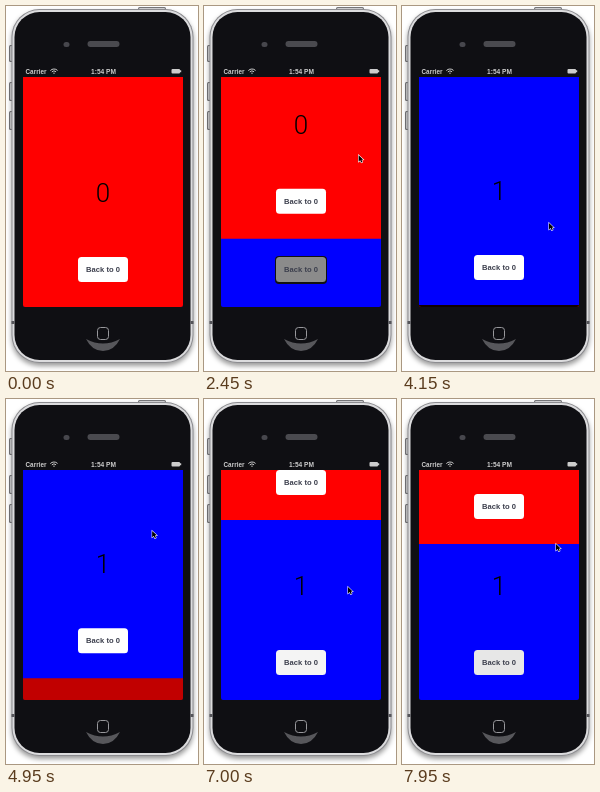
These frames come from a looping animation (192 px wide and 365 px high, 8000 ms). An HTML page with a canvas:

```html
<!DOCTYPE html>
<html lang="en">
<head>
<meta charset="utf-8">
<title>Swipe pages</title>
<style>
html, body { margin: 0; width: 100%; height: 100%; overflow: hidden; background: #fff; }
canvas { display: block; width: 192px; height: 365px; }
</style>
</head>
<body>
<canvas id="stage"></canvas>
<script>
const LOOP = 8000, STEP = 50, H = 230;
const BODY = '#0f0f13', STATUS = '#ccc';
const SANS = '"Liberation Sans", Arial, sans-serif';
const canvas = document.getElementById('stage');
const c = canvas.getContext('2d');
const ratio = window.devicePixelRatio || 1;
canvas.width = 192 * ratio;
canvas.height = 365 * ratio;
c.scale(ratio, ratio);

function ease(t, from, to) {
  const p = Math.min(1, Math.max(0, (t - from) / (to - from)));
  return p * p * (3 - 2 * p);
}

// Page offsets and pointer place, each a sum of gestures
function pose(t) {
  const enter = ease(t, 900, 1550);
  const swipe = ease(t, 1800, 2700), settle = ease(t, 2700, 3050);
  const back = ease(t, 3050, 3650);
  const nudge = ease(t, 4090, 4750), bounce = ease(t, 4750, 5050);
  const rest = ease(t, 4750, 5600);
  const grab = ease(t, 5600, 5900), pull = ease(t, 6200, 7000);
  const finish = ease(t, 7000, 7400), leave = ease(t, 7400, 7950);
  return {
    first: -84 * swipe - 146 * settle + 14 * grab + 36 * pull + 24 * finish,
    second: 84 * (bounce - nudge),
    x: 195 - 42 * enter + 2 * swipe - 8 * back - 6 * rest + 3 * pull + 10 * leave,
    y: 290 - 71 * enter - 86 * (swipe - back + nudge) - 8 * rest
      + 14 * grab + 49 * pull + 24 * finish - 67 * leave
  };
}

function box(x, y, w, h, r, fill) {
  c.beginPath();
  c.roundRect(x, y, w, h, r);
  c.fillStyle = fill;
  c.fill();
}

function label(str, x, y, font, color, align = 'center') {
  c.font = font;
  c.textAlign = align;
  c.fillStyle = color;
  c.fillText(str, x, y);
}

function phone() {
  box(0, 0, 192, 365, 0, '#fff');

  // Side and top buttons
  for (const [y, h] of [[39, 17], [76, 19], [105, 19]]) {
    box(3, y, 4, h, 1.5, '#77777a');
    box(4, y + 1, 3, h - 2, 1, '#d4d4d6');
  }
  box(132, 1, 28, 4, 1.5, '#77777a');
  box(133, 2, 26, 3, 1, '#d4d4d6');

  c.save();
  c.shadowColor = 'rgba(0,0,0,.4)';
  c.shadowBlur = 5 * ratio;
  c.shadowOffsetY = 3 * ratio;
  box(5.5, 3, 182, 354, 28, '#8c8c90');
  c.restore();
  box(6.5, 4, 180, 352, 27, '#dcdcde');
  box(8.5, 6, 176, 348, 25, BODY);
  for (const x of [5.5, 184.5]) box(x, 315, 3, 3, 0, '#55555a');

  // Camera and speaker
  box(57.5, 36, 6, 5, 2.5, '#47474d');
  box(81.5, 35, 32, 6, 3, '#4a4a4f');

  // Home button
  c.beginPath();
  c.moveTo(80, 333);
  c.quadraticCurveTo(97, 342, 114, 333);
  c.quadraticCurveTo(108, 345, 97, 345);
  c.quadraticCurveTo(86, 345, 80, 333);
  c.fillStyle = '#57575b';
  c.fill();
  box(91.5, 321.5, 11, 12, 3, BODY);
  c.strokeStyle = '#98989c';
  c.lineWidth = 1;
  c.stroke();

  // Status bar
  label('Carrier', 19.5, 67.8, `bold 6.4px ${SANS}`, STATUS, 'left');
  label('1:54 PM', 97.5, 67.8, `bold 6.6px ${SANS}`, STATUS);
  c.strokeStyle = STATUS;
  for (const r of [1, 3, 5]) {
    c.beginPath();
    c.arc(48, 68, r, -Math.PI * .76, -Math.PI * .24);
    c.stroke();
  }
  box(165.5, 63, 8.5, 4.5, 1, STATUS);
  box(174, 64.3, 1.2, 2, 0, STATUS);
}

// reveal: how far the page above has been pulled away, 0 to 1
function page(n, y, reveal) {
  const shade = .92 * (1 - reveal) ** 2;
  const dark = Math.max(0, 1 - 8 * reveal);
  const v = Math.round(255 * (1 - shade));
  c.save();
  c.translate(0, y);
  box(17, 71, 160, H, 0, n % 2 ? '#00f' : '#f00');
  label(n, 97, 196, '300 26px Roboto, sans-serif', '#000');
  if (shade > .2) box(71, 250, 52, 28, 4, '#111');
  box(72, 251, 50, 25, 3.5, `rgb(${v},${v},${v})`);
  label('Back to 0', 97, 266, `bold 7.6px ${SANS}`, '#3b3e4c');
  box(17, 71, 160, H, 0, `rgba(0,0,0,${dark})`);
  c.restore();
}

function cursor(x, y) {
  c.save();
  c.translate(x, y);
  c.scale(.8, .8);
  c.beginPath();
  for (const [dx, dy] of [[0, 0], [0, 8], [2, 6.4], [3.4, 9.2], [4.8, 8.5], [3.5, 5.8], [5.8, 5.6]])
    c.lineTo(dx, dy);
  c.closePath();
  c.strokeStyle = '#fff';
  c.lineWidth = 1.3;
  c.stroke();
  c.fillStyle = '#000';
  c.fill();
  c.restore();
}

function draw(now) {
  const t = Math.floor(now % LOOP / STEP) * STEP;
  const { first, second, x, y } = pose(t);
  phone();
  c.save();
  c.beginPath();
  c.roundRect(17, 71, 160, H, [0, 0, 2, 2]);
  c.clip();
  if (second < 0) page(2, 0, -second / H);
  page(1, second, -first / H);
  page(0, first, 1);
  c.restore();
  if (t >= 900) cursor(x, y);
}

const start = performance.now();
function tick() {
  draw(performance.now() - start);
  requestAnimationFrame(tick);
}
tick();
</script>
</body>
</html>
```
